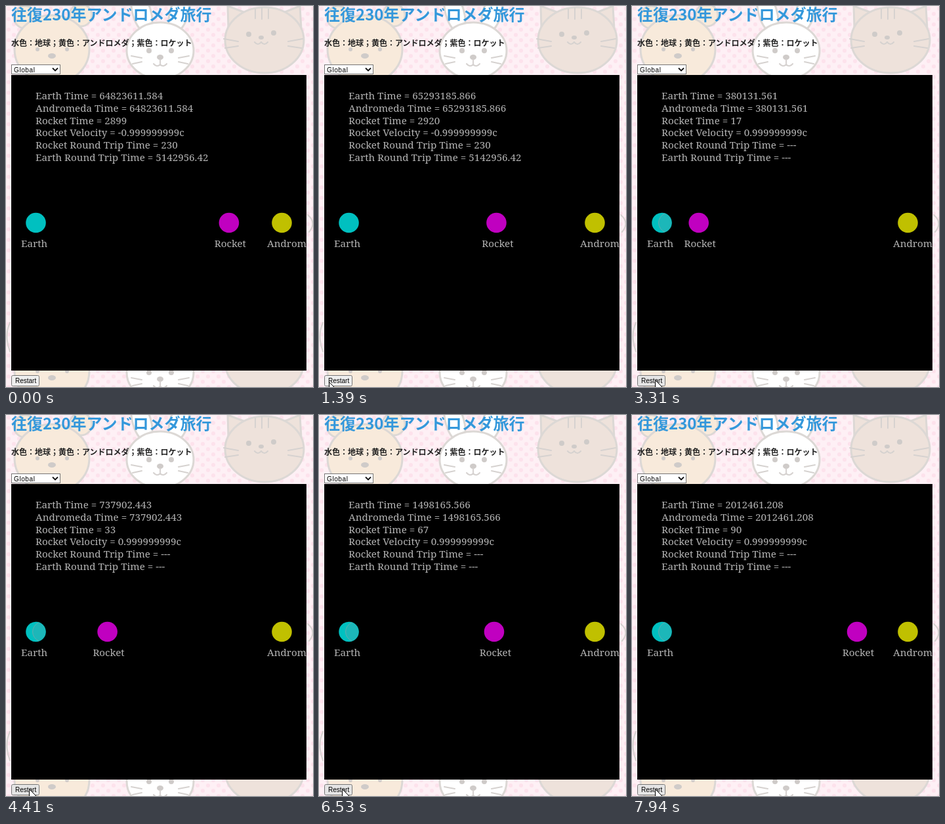
These frames come from a looping animation (468x580 px, 8000 ms). An HTML page:

```html
<!DOCTYPE html>
<html lang="ja">
<head>
<meta charset="utf-8">
<title>Rocket trip</title>
<style>
  html, body { margin: 0; width: 100%; height: 100%; overflow: hidden; }
  svg { display: block; }
  .sans { font-family: "Noto Sans CJK JP", "Noto Sans CJK", "Noto Sans", sans-serif; font-weight: 700; }
  .ui { font: 10px "Liberation Sans", sans-serif; fill: #000; }
  .space { font: 15.2px "Noto Serif", serif; fill: #b4b4b4; white-space: pre; }
  .line { fill: none; stroke: #d6d2d0; stroke-width: 2; stroke-linecap: round; }
  .animal { stroke: #dcd8d5; stroke-width: 3; }
</style>
</head>
<body>
<svg width="468" height="580" viewBox="0 0 468 580">
  <defs>
    <pattern id="dots" width="16" height="16" patternUnits="userSpaceOnUse">
      <rect width="16" height="16" fill="#fef0f5"/>
      <circle cx="4" cy="4" r="3" fill="#fde2ec"/>
      <circle cx="12" cy="12" r="3" fill="#fde2ec"/>
    </pattern>
    <clipPath id="screen"><rect x="8" y="105" width="450" height="450"/></clipPath>
    <g id="animals">
      <g class="animal" fill="#f8eadb">
        <circle cx="29" cy="17" r="17"/>
        <circle cx="114" cy="14" r="17"/>
        <ellipse cx="70" cy="66" rx="57" ry="52"/>
      </g>
      <g class="animal" fill="#fff">
        <ellipse cx="207" cy="10" rx="14" ry="32" transform="rotate(-16 207 10)"/>
        <ellipse cx="264" cy="10" rx="14" ry="32" transform="rotate(16 264 10)"/>
        <ellipse cx="235" cy="68" rx="51" ry="43"/>
      </g>
      <g class="animal" fill="#eee2db">
        <path d="M339 34L338 0L370 12ZM418 12L448 0L450 34Z"/>
        <ellipse cx="394" cy="52" rx="60" ry="50"/>
      </g>
      <g fill="#cfcbc9">
        <circle cx="48" cy="66" r="3"/><circle cx="93" cy="66" r="3"/>
        <ellipse cx="70" cy="76" rx="6" ry="4"/>
        <circle cx="218" cy="68" r="4"/><circle cx="252" cy="68" r="4"/>
        <ellipse cx="235" cy="78" rx="5" ry="4"/>
        <circle cx="370" cy="43" r="4"/><circle cx="408" cy="41" r="4"/>
        <ellipse cx="389" cy="48" rx="4" ry="3"/>
      </g>
      <path class="line" d="M235 82v8M225 88q5 6 10 1q5 5 10-1M379 55q5 6 10 0q5 6 10 0
        M332 50l22 4M334 64l20-3M430 54l22-4M430 61l20 3M380 5v14M390 3v17M400 5v14
        M191 76l16 3M193 88l14-3M263 79l16-3M263 85l14 3"/>
    </g>
  </defs>

  <rect width="468" height="580" fill="url(#dots)"/>
  <use href="#animals"/>
  <use href="#animals" y="490"/>
  <path class="line" d="M6 482q-9 20 0 44M460 318q14 12 2 26"/>

  <text class="sans" x="8" y="21.5" font-size="24" fill="#3498db">往復230年アンドロメダ旅行</text>
  <text class="sans" x="8" y="61" font-size="12" fill="#222">水色：地球；黄色：アンドロメダ；紫色：ロケット</text>

  <rect x="8.5" y="89.5" width="74" height="14" fill="#fff" stroke="#767676"/>
  <text class="ui" x="12" y="100.5" letter-spacing=".6">Global</text>
  <path d="M71 94.5l4 4 4-4" fill="none" stroke="#111" stroke-width="1.8"/>

  <rect x="8" y="105" width="450" height="450"/>
  <g clip-path="url(#screen)">
    <g id="readout" class="space"></g>
    <circle cx="45.5" cy="330" r="15.3" fill="#00c0c0"/>
    <path id="crescent" d="M50.2 315.8A15 15 0 0 0 50.2 344.2A15 15 0 0 0 50.2 315.8" fill="#1cb7b9"/>
    <path id="rim" d="M50.2 316A15 15 0 0 0 50.2 344" fill="none" stroke="#62aeb0"/>
    <text class="space" x="23" y="367">Earth</text>
    <circle cx="420.5" cy="330" r="15.3" fill="#c0c000"/>
    <text class="space" x="398" y="367">Andromeda</text>
    <g id="rocket">
      <circle cx="45.5" cy="330" r="15.3" fill="#c000c0"/>
      <text class="space" x="23.3" y="367">Rocket</text>
    </g>
  </g>

  <rect id="button" x="8.5" y="562.5" width="42" height="16" rx="2" stroke="#767676"/>
  <text class="ui" x="14" y="574">Restart</text>
  <path id="cursor" d="M.5 .5V16.5L4.2 13L6.8 18.8L9.2 17.7L6.7 12H11.8Z" fill="#fff" stroke="#000"/>
</svg>
<script>
const LOOP = 8000;
const RESTART = 2300;
const YEARS_PER_TICK = 22360.6800912;
const PX_PER_TICK = 3.306;

// [time, repaint count, rocket clock]
const beforeRestart = [
  [0, 0, 2899], [670, 7, 2910], [790, 8, 2911.6], [890, 9, 2913], [1890, 19, 2928.2], [2200, 22, 2933]
];
const afterRestart = [
  [2300, 23, 1], [2600, 26, 6], [3310, 33, 17], [3410, 34, 19], [4310, 43, 32], [5110, 51, 45],
  [5230, 52, 46.8], [5440, 54, 50], [5530, 55, 51.5], [6530, 65, 67], [6930, 69, 74],
  [7740, 77, 87], [7940, 79, 90]
];
// [time, x, y]
const cursorPath = [
  [0, 125, 600], [430, 118, 595], [570, 107, 572], [670, 95, 548], [890, 73, 556],
  [1090, 18, 572], [1190, 1, 574], [1390, 15, 572], [1690, 35, 569]
];

// Linear interpolation of a row, looked up by one of its columns.
function rowAt(rows, value, column = 0) {
  const next = rows.findIndex(row => row[column] > value);
  if (next < 0) return rows[rows.length - 1];
  if (next === 0) return rows[0];
  const a = rows[next - 1], b = rows[next];
  const k = (value - a[column]) / (b[column] - a[column]);
  return a.map((start, i) => start + (b[i] - start) * k);
}

const repaints = Array.from({ length: 80 }, (_, i) => {
  const [time, , tick] = rowAt(i < 23 ? beforeRestart : afterRestart, i, 1);
  return { time: Math.round(time / 10) * 10, tick: Math.floor(tick + 1e-6) };
});

const byId = id => document.getElementById(id);
const lines = Array.from({ length: 6 }, (_, i) => {
  const line = document.createElementNS("http://www.w3.org/2000/svg", "text");
  line.setAttribute("x", 45);
  line.setAttribute("y", 142 + i * 18.75);
  return byId("readout").appendChild(line);
});

function buttonColor(time) {
  if (time < 1590) return "#efefef";
  return time >= 2150 && time < RESTART ? "#f5f5f5" : "#e5e5e5";
}

function draw(now) {
  const { time, tick } = repaints.filter(r => r.time <= now).pop();
  const returning = time < RESTART;
  const years = (Math.floor(tick * YEARS_PER_TICK * 1000) / 1000).toFixed(3);
  const offset = returning ? 182 + (2933 - tick) * PX_PER_TICK : tick * PX_PER_TICK;

  [
    `Earth Time = ${years}`,
    `Andromeda Time = ${years}`,
    `Rocket Time = ${tick}`,
    `Rocket Velocity = ${returning ? "-" : ""}0.999999999c`,
    `Rocket Round Trip Time = ${returning ? "230" : "---"}`,
    `Earth Round Trip Time = ${returning ? "5142956.42" : "---"}`
  ].forEach((text, i) => { lines[i].textContent = text; });

  byId("rocket").setAttribute("transform", `translate(${offset} 0)`);
  for (const id of ["crescent", "rim"]) byId(id).style.display = returning ? "none" : "";
  byId("button").setAttribute("fill", buttonColor(time));

  const [, x, y] = rowAt(cursorPath, time);
  byId("cursor").setAttribute("transform", `translate(${Math.round(x)} ${Math.round(y)})`);
}

const start = performance.now();
function loop() {
  draw((performance.now() - start) % LOOP);
  requestAnimationFrame(loop);
}
loop();
</script>
</body>
</html>
```
